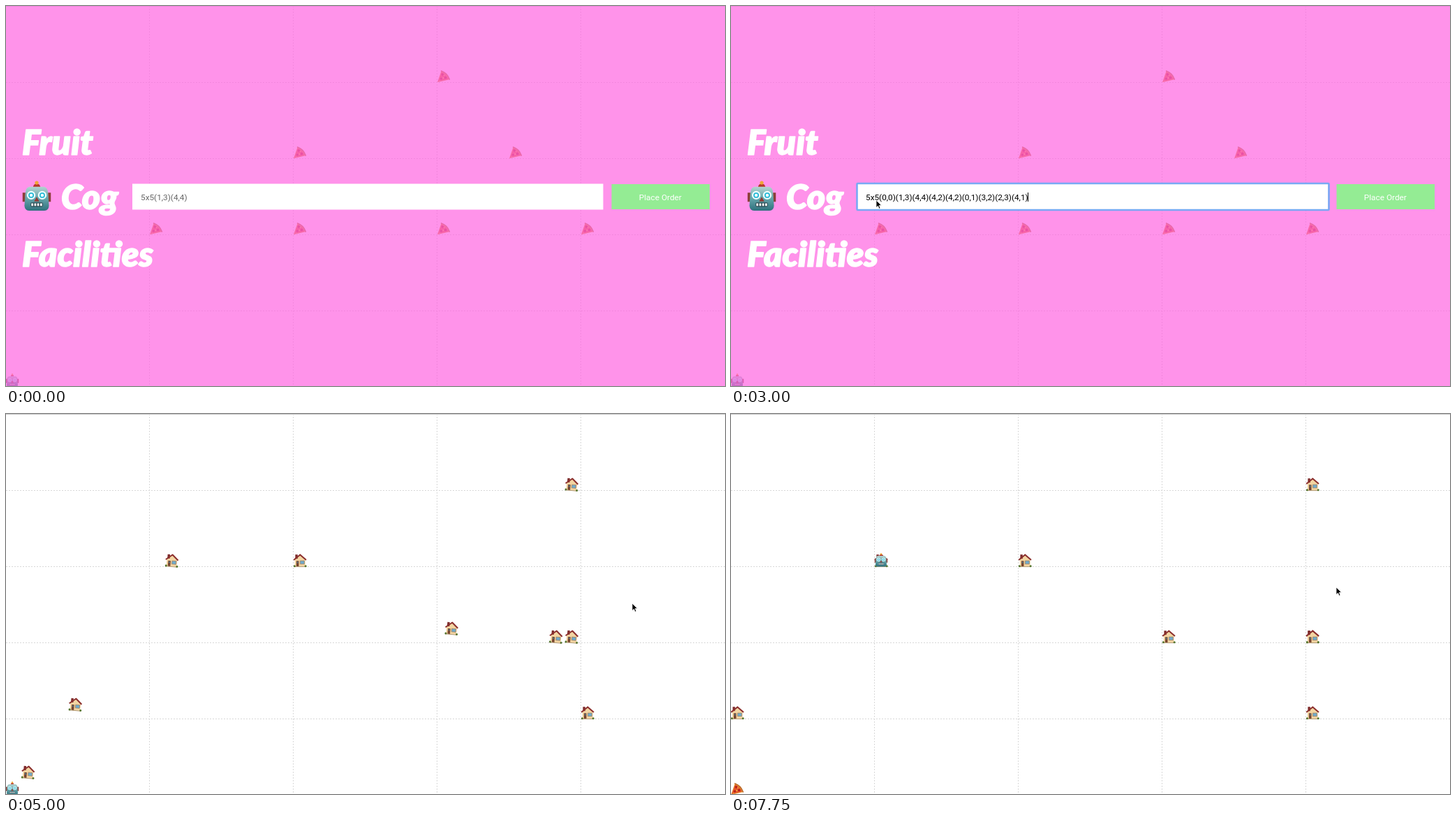
These frames come from a looping animation (1030x544 px, 8 s). An HTML page:

```html
<!DOCTYPE html>
<html lang="en">
<head>
<meta charset="utf-8">
<title>Robot courier</title>
<style>
  html, body { margin: 0; width: 100%; height: 100%; overflow: hidden; background: #fff; }
  svg { display: block; width: 1030px; height: 544px; }
  text { font: 11.8px Roboto, "Liberation Sans", sans-serif; white-space: pre; }
  .title text {
    font: italic 900 50px Lato, cursive;
    fill: #fff; stroke: #fff; stroke-width: 1.4px; stroke-linejoin: round;
  }
</style>
</head>
<body>
<svg viewBox="0 0 1030 544">
  <defs>
    <linearGradient id="metal" x2="0" y2="1">
      <stop stop-color="#b4d3d0"/><stop offset=".5" stop-color="#64a3a9"/><stop offset="1" stop-color="#2e707c"/>
    </linearGradient>
    <g id="house">
      <path d="M2.8 9.5 10.3 3 17.6 9.5V19.3H2.8Z" fill="#f3d5a2"/>
      <path d="M3.4 2.2h3.4v6H3.4Z" fill="#7d2b2b"/>
      <path d="M1.2 10 10.3 2.4 19 10" fill="none" stroke="#8b2f2d" stroke-width="2" stroke-linejoin="round"/>
      <path d="M4.9 11.3h3.6v8H4.9Z" fill="#78452f"/>
      <path d="M5.8 12.4h1.8v2.2H5.8Z" fill="#547985"/>
      <path d="M10.4 11.1h6v4.7h-6Z" fill="#6faacb" stroke="#a17b58" stroke-width=".7"/>
      <path d="M2 19.6h16.5" stroke="#b39b76" stroke-width="1"/>
      <g fill="#55752f"><circle cx="2.4" cy="18.8" r="1.5"/><circle cx="18.2" cy="18.8" r="1.5"/></g>
    </g>
    <g id="pizza">
      <path d="M1 19.2 6.5 3.2Q14.6 6 18 15.2Z" fill="#e8912d"/>
      <path d="M2 18 7 4.8Q13.5 7.5 16.6 14.6Z" fill="#e4552a"/>
      <path d="M6.6 3Q15 5.8 18.3 15" fill="none" stroke="#b9692a" stroke-width="1.6" stroke-linecap="round"/>
      <g fill="#b51e1b"><circle cx="8.3" cy="8" r="1.7"/><circle cx="12.6" cy="12.6" r="1.8"/><circle cx="6.4" cy="14" r="1.6"/></g>
      <g fill="#f6c14b"><circle cx="10.8" cy="9.2" r=".8"/><circle cx="9.3" cy="13" r=".9"/><circle cx="4.3" cy="16.8" r=".6"/></g>
    </g>
    <g id="robot">
      <path d="M.8 7.8h2.5v6H.8ZM16.7 7.8h2.5v6h-2.5Z" fill="#8c3d37"/>
      <path d="M7.6 4.4Q7.8 2 10 2T12.4 4.4Z" fill="#b5382b"/>
      <circle cx="10" cy="1.4" r="1.2" fill="#eea735"/>
      <path d="M5.2 4H14.8Q17.1 4.4 17.4 8L18 16.4Q17.8 19.4 15 19.6H5Q2.2 19.4 2 16.4L2.6 8Q2.9 4.4 5.2 4Z" fill="url(#metal)"/>
      <g fill="#25b9d6" stroke="#effdfd"><circle cx="6.4" cy="9.5" r="2.3"/><circle cx="13.6" cy="9.5" r="2.3"/></g>
      <g fill="#fff"><circle cx="6.4" cy="9.5" r="1"/><circle cx="13.6" cy="9.5" r="1"/></g>
      <path d="M10 10.6 11.7 13.5H8.3Z" fill="#923a34"/>
      <rect x="6" y="14.2" width="8" height="2.9" rx=".8" fill="#2b4b53"/>
      <path d="M6.5 15.6h7" stroke="#fff" stroke-width="1.7" stroke-dasharray="1.25 .67"/>
    </g>
  </defs>
  <path d="M0 .5H1030" stroke="#ccc"/>
  <path id="grid" stroke="#d8d8d8" stroke-dasharray="2 2"/>
  <g id="items"></g>
  <use id="bot" href="#robot"/>
  <g id="form">
    <rect width="1030" height="544" fill="#ff66e2" fill-opacity=".7"/>
    <g class="title">
      <text x="23" y="213">Fruit</text>
      <text x="79" y="291">Cog</text>
      <text x="23" y="373">Facilities</text>
    </g>
    <use href="#robot" transform="translate(22 250) scale(2.2)"/>
    <rect x="181" y="254.5" width="674.5" height="37" fill="#fff"/>
    <rect id="ring" x="180.5" y="254" width="676" height="38" rx="1" fill="none" stroke="#78a9f4" stroke-width="2.6"/>
    <text id="order" x="193" y="277.5"></text>
    <path id="caret" d="M425.5 267V280" stroke="#000"/>
    <rect x="867.5" y="255" width="140.5" height="36" fill="#94ec94"/>
    <text id="button" x="937.3" y="277.5" text-anchor="middle" fill="#fff">Place Order</text>
  </g>
  <path id="pointer" d="M0 0V10.6L2.5 8.3 4.2 12.2 6 11.4 4.3 7.6H7.6Z" stroke="#fff" stroke-width=".8"/>
</svg>
<script>
const LOOP = 8000, STEP = 250, FOCUS = 2250, PASTE = 2750, SWITCH = 5000, DEPART = 5750, MOVE = 500;
const HINT = '5x5(1,3)(4,4)', ORDER = '5x5(0,0)(1,3)(4,4)(4,2)(4,2)(0,1)(3,2)(2,3)(4,1)';

const $ = id => document.getElementById(id);
const ease = k => 1 - (1 - Math.min(1, Math.max(0, k))) ** 2.34;
const show = (id, on) => $(id).setAttribute('visibility', on ? 'inherit' : 'hidden');
const move = (id, pos) => $(id).setAttribute('transform', `translate(${pos})`);
const cell = (col, row) => [206 * col - 1, 526 - 109 * row];
const place = (name, x, y, turn = 0) =>
  `<use href="#${name}" transform="translate(${x} ${y}) rotate(${turn} 10 10)"/>`;

const stops = [...ORDER.matchAll(/\((\d),(\d)\)/g)].map(m => [+m[1], +m[2]]);
const oldDrops = [[3, 4], [2, 3], [3.5, 3], ...[1, 2, 3, 4].map(col => [col, 2])];
// how far each house starts from its stop, in 11 px units
const drift = [[2, -2], [2, 0], [-2, 0], [-2, 0], [-4, 0], [8, -1], [1, -1]];
// start, end, and where the pointer arrives
const glides = [[250, 1250, 236, 273], [1750, 2000, 208, 278], [3000, 4750, 897, 271], [6250, 6750, 867, 248]];

$('grid').setAttribute('d', [1, 2, 3, 4].map(i =>
  `M${206 * i - .5} 0V544M0 ${109 * i + .5}H1030`).join(''));

function pointerAt(t) {
  return glides.reduce(([x, y], [from, to, toX, toY]) => {
    const k = ease((t - from) / (to - from));
    return [x + (toX - x) * k, y + (toY - y) * k];
  }, [426, 189]);
}

function town(t) {
  if (t < SWITCH) return oldDrops.map(stop => place('pizza', ...cell(...stop)));
  const left = 1 - ease((t - SWITCH) / MOVE);
  return stops.map((stop, i) => {
    const [x, y] = cell(...stop), [dx, dy] = drift[i] || [0, 0];
    const name = i === 0 && t >= DEPART ? 'pizza' : 'house';
    return place(name, x + 11.3 * dx * left, y + 12 * dy * left, dx ? 5 * left : 0);
  });
}

// One cell per move: east to the next stop's column, then north to its row.
function botAt(t) {
  const k = Math.max(0, (t - DEPART) / MOVE), whole = Math.floor(k);
  const done = whole + ease(k - whole), [col, row] = stops[1];
  return cell(Math.min(done, col), Math.min(Math.max(0, done - col), row));
}

function draw(t) {
  const pasted = t >= PASTE, focused = t >= FOCUS, pointer = pointerAt(t);
  $('items').innerHTML = town(t).join('');
  move('bot', botAt(t));
  move('pointer', pointer);
  show('pointer', t >= STEP);
  show('form', t < SWITCH);
  show('ring', focused);
  show('caret', pasted && t % 1000 < 500);
  $('order').textContent = pasted ? ORDER : HINT;
  $('order').setAttribute('fill', pasted ? '#000' : '#666');
  $('button').style.fontWeight = pointer[0] > 867 ? 'bold' : 'normal';
}

function frame(now) {
  draw(Math.floor(now % LOOP / STEP) * STEP);
  requestAnimationFrame(frame);
}
requestAnimationFrame(frame);
</script>
</body>
</html>
```
